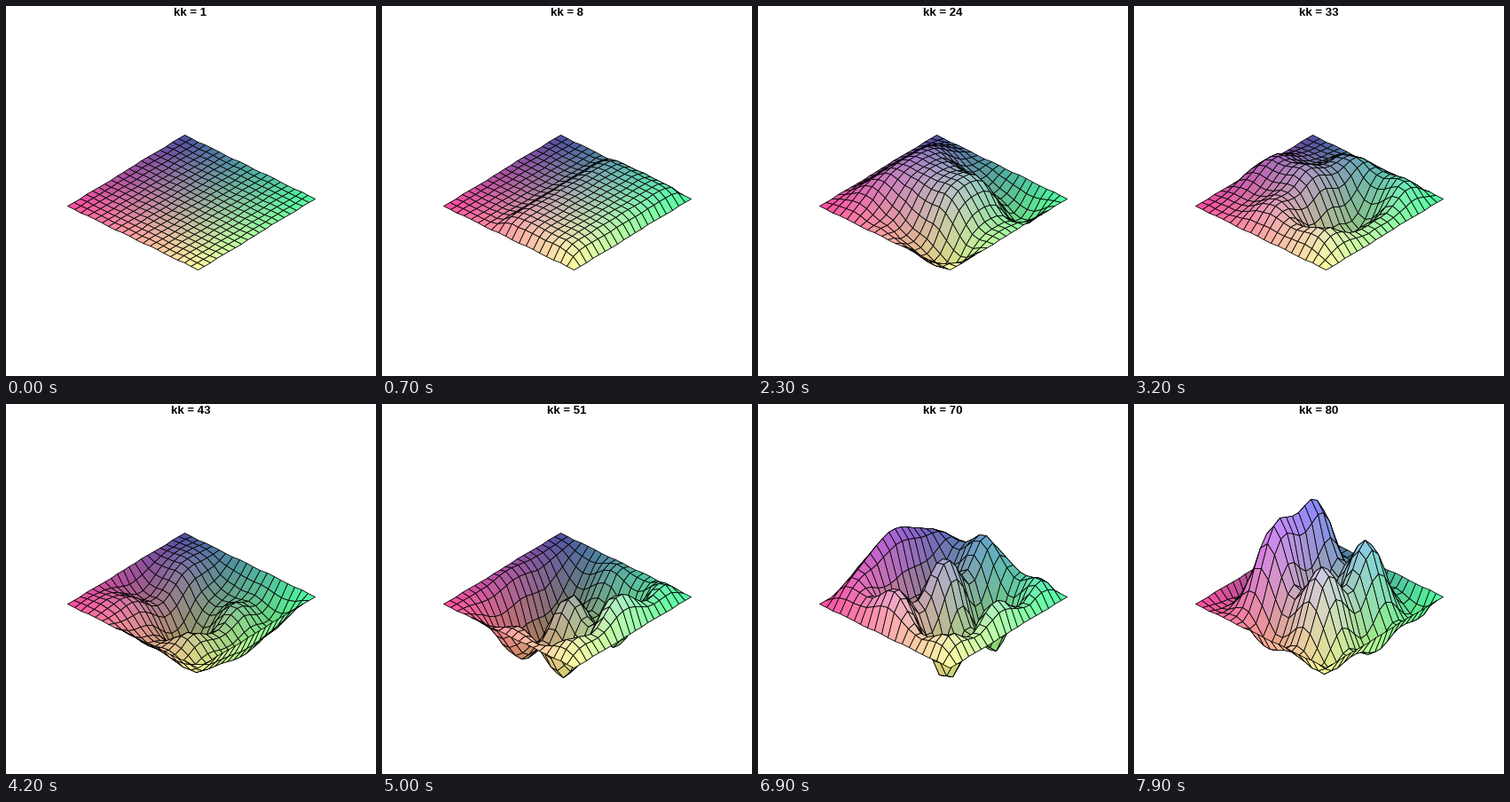
Animation, 417 px wide and 417 px high, one loop 8 s. Source, as a matplotlib script:

```python
import numpy as np
import matplotlib.pyplot as plt
from matplotlib.animation import FuncAnimation
from matplotlib.collections import PolyCollection

SIZE, DPI = 417, 128
FRAMES, INTERVAL = 80, 100
PX = 72 / DPI  # points per pixel

CELLS = 19
SPEED = 0.0211  # wave speed, membrane widths per frame
PERIOD = 20     # of the driving force, in frames
FORCE = 1.05    # peak push, pixels per frame squared
DRIVEN = 0.4    # the force acts where v is above this

# Parallel projection of the unit square: pixel origin and axes
ORIGIN = np.array([201.0, 145.0])
AXIS_U = np.array([-132.0, 80.0])
AXIS_V = np.array([147.0, 72.0])

grid = np.linspace(0, 1, CELLS + 1)
u, v = np.meshgrid(grid, grid, indexing="ij")
base = ORIGIN + u[..., None] * AXIS_U + v[..., None] * AXIS_V

# Cells from back to front
ci, cj = np.array(sorted(np.ndindex(CELLS, CELLS), key=sum)).T
rows = np.stack([ci, ci + 1, ci + 1, ci], axis=1)
cols = np.stack([cj, cj, cj + 1, cj + 1], axis=1)


def laplacian(z):
    """Five-point sum on the interior; the rim stays clamped."""
    out = np.zeros_like(z)
    out[1:-1, 1:-1] = (z[2:, 1:-1] + z[:-2, 1:-1] + z[1:-1, 2:] + z[1:-1, :-2]
                       - 4 * z[1:-1, 1:-1])
    return out


def simulate():
    """Clamped membrane at rest, shaken on one side by a sine force."""
    push = np.zeros_like(u)
    push[1:-1, 1:-1] = FORCE * (v[1:-1, 1:-1] > DRIVEN)
    courant = (SPEED * CELLS) ** 2
    past = now = np.zeros_like(u)
    waves = []
    for n in range(FRAMES):
        waves.append(now)
        pull = courant * laplacian(now) + push * np.sin(2 * np.pi * n / PERIOD)
        past, now = now, 2 * now - past + pull
    return waves


def colours(z):
    rgb = np.stack([0.3 + 0.7 * u, 0.3 + 0.7 * v, 0.63 + 0.0042 * z], axis=-1)
    return np.clip(rgb[rows, cols].mean(axis=1), 0, 1)


waves = simulate()

fig = plt.figure(figsize=(SIZE / DPI, SIZE / DPI), dpi=DPI, facecolor="white")
ax = fig.add_axes([0, 0, 1, 1])
ax.set(xlim=(0, SIZE), ylim=(SIZE, 0))
ax.axis("off")
mesh = PolyCollection([], edgecolors="black", linewidths=0.8 * PX)
ax.add_collection(mesh, autolim=False)
title = ax.text(208, 11, "", ha="center", va="baseline", color="black",
                family="Liberation Sans", weight="bold", size=13.3 * PX)


def update(n):
    z = waves[n]
    points = base.copy()
    points[..., 1] -= z
    mesh.set_verts(np.round(points[rows, cols]) + 0.5)
    mesh.set_facecolor(colours(z))
    title.set_text(f"kk = {n + 1}")
    return mesh, title


anim = FuncAnimation(fig, update, frames=FRAMES, interval=INTERVAL,
                     repeat=True, repeat_delay=0, blit=False)
plt.show()
```
